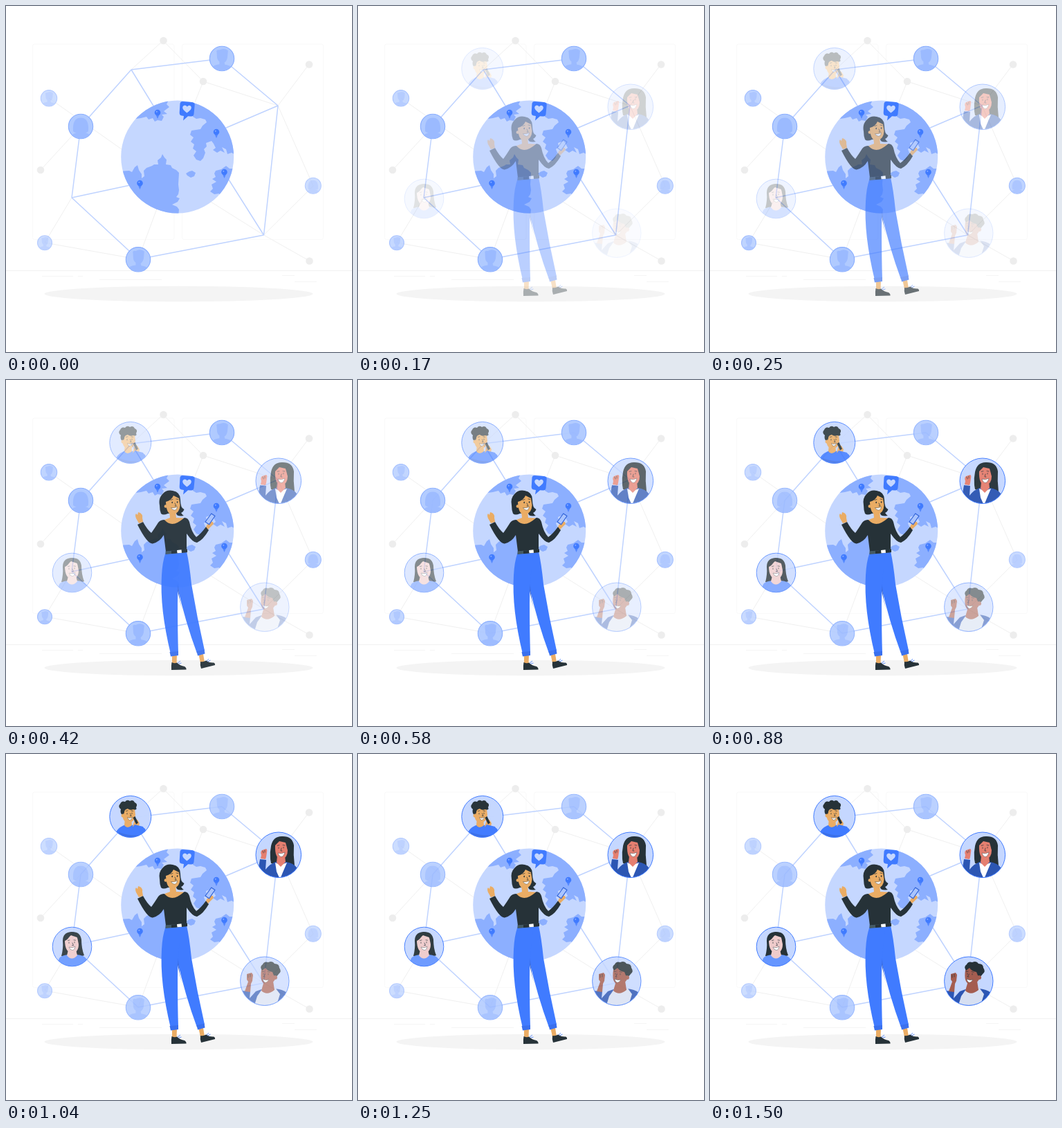
Animation of 500 by 500 pixels, one loop 1580 ms. Source, as an HTML page:

```html
<!DOCTYPE html>
<html lang="en">
<head>
<meta charset="utf-8">
<title>Connected world</title>
<style>
html, body { margin: 0; width: 100%; height: 100%; overflow: hidden; background: #fff; }
svg { display: block; width: 100%; height: 100%; }
.ink { fill: #263238; }
.blue { fill: #407bff; }
.navy { fill: #2c56b3; }
.tan { fill: #eaac64; }
.rose { fill: #e57f70; }
.pale { fill: #efcbcb; }
.brown { fill: #a45d50; }
.pen { fill: none; stroke: #263238; stroke-width: .7; stroke-linecap: round; }
.smile { fill: #fff; stroke: #263238; stroke-width: .4; }
.disc { fill: #c5d7ff; }
.ring { fill: none; stroke: #407bff; stroke-width: 1; }
.fade { opacity: 0; }
</style>
</head>
<body>
<svg viewBox="0 0 500 500">
  <defs>
    <clipPath id="globeClip"><circle cx="247.7" cy="218" r="81.5"/></clipPath>
    <clipPath id="clipA"><circle cx="179.8" cy="90.5" r="30"/></clipPath>
    <clipPath id="clipB"><circle cx="393.8" cy="145.8" r="32.8"/></clipPath>
    <clipPath id="clipC"><circle cx="95.5" cy="278.5" r="28.3"/></clipPath>
    <clipPath id="clipD"><circle cx="373.8" cy="328.2" r="35.2"/></clipPath>
  </defs>

  <g fill="none" stroke="#f9f9f9">
    <rect x="38.5" y="55" width="204.500" height="282.500" rx="3"/>
    <rect x="254.500" y="55" width="204" height="282.500" rx="3"/>
    <path d="M52 390.500H97M104 390.500H111M135 395.500H225M399 389.500H417M417 398.500H449" stroke="#f5f5f5"/>
    <path d="M0 382.500H500" stroke="#f1f1f1"/>
  </g>
  <ellipse cx="249.500" cy="416" rx="194" ry="11.300" fill="#f4f4f4"/>

  <g id="links" fill="none"></g>

  <circle cx="247.700" cy="218" r="81.500" fill="#c5d7ff"/>
  <g clip-path="url(#globeClip)" fill="#8cafff">
    <path d="M160 239L178 238 182 240 186 233 190 230 192 237 196 243 196 249 200 246 199 238 203 234 211 231 214 229 220 229 219 223 224 219 226 214 229 219 232 222 231 229 238 230 240 234 246 237 250 241 249 258 250 266 249 272 246 276 251 278 248 283 240 287 247 290 250 294 249 305 160 305Z"/>
    <path d="M180 166L188 163 195 162 203 160 206 164 212 162 215 167 219 165 225 166 228 160 225 157 233 156 228 152 236 146 232 142 237 132 180 132Z"/>
    <path d="M272 132L270 160 275 163 281 162 288 164 290 168 284 173 281 178 268 180 266 186 271 190 267 196 272 200 270 206 275 210 271 216 275 222 281 224 285 220 288 212 286 207 290 203 289 198 297 195 300 199 303 205 299 208 305 212 310 209 316 212 312 204 318 207 320 214 326 212 335 217 335 132Z"/>
    <path d="M335 235L323 235 318 231 311 236 303 238 301 242 303 247 298 250 304 254 297 258 299 264 295 268 301 272 308 271 311 278 335 278Z"/>
    <path d="M260 242L265 239 269 238 274 241 272 246 267 248 262 245Z"/>
  </g>
  <g id="pins"></g>
  <g>
    <path class="blue" d="M255 138L269 139Q273 139.500 272.700 143L271.500 156Q271 160 267 159.500L263 159.300 256 165.500 257 159 254 158.500Q250.500 158 250.700 154L251.500 141Q252 138 255 138Z"/>
    <path fill="#c5d7ff" d="M261.500 154.500C257 151 254.800 149 255.300 146C256 143 260 142.500 261.800 145.600C264 142.700 267.600 143.600 267.800 146.700C267.900 149.800 264.500 152 261.500 154.500Z"/>
  </g>

  <g id="nodes"></g>

  <g class="fade" data-key="A">
    <circle class="disc" cx="179.800" cy="90.500" r="30"/>
    <g clip-path="url(#clipA)">
      <path class="blue" d="M155 124L160 111Q164 105 173 102L186 103Q196 104 201 108L207 124Z"/>
      <path fill="#3567d6" d="M163 113Q180 119 196 117L204 124H158Z" opacity=".55"/>
      <path class="tan" d="M172 92L171 103Q175 109 182 103L181 94Z"/>
      <path class="tan" d="M168 83Q167 98 177 99.500Q186 99 187 88L186 79 171 76Z"/>
      <path class="ink" d="M169 90Q164 84 166 80Q161 76 165 72Q167 67 172 69Q175 65 179 68Q184 65 186 70Q191 72 188 77Q190 82 184 80Q179 82 176 79Q171 80 171 84Z"/>
      <circle class="tan" cx="169" cy="89" r="2.500"/>
      <path class="tan" d="M183 105L185 98Q186 94 190 95L193 100 192 105 189 108Z"/>
      <path class="ink" d="M183.500 92L186.500 90 191 99.500 188 101.500Z"/>
      <path class="blue" d="M181 108L186 102 198 105 201 112 188 115Z"/>
      <path class="pen" d="M175 85.500v1.500M182 85v1.500M173.500 82.500l2.500-.6M181 82l2.500.4M179.500 86l1.500 3.500h-1.800"/>
      <path class="smile" d="M175.500 91.500Q179 94 182.500 91Q181.500 96 178.500 95.500Q176.500 95 175.500 91.500Z"/>
    </g>
    <circle class="ring" cx="179.800" cy="90.500" r="30"/>
  </g>

  <g class="fade" data-key="B">
    <circle class="disc" cx="393.800" cy="145.800" r="32.800"/>
    <g clip-path="url(#clipB)">
      <path class="ink" d="M382 152Q381 142 383 133Q386 118 400 119Q414 119 416 132Q415 146 417 161L405 162 383 158Z"/>
      <path class="navy" d="M362 182L367 152 376 153 375 167Q382 158 392 155L405 156Q416 158 420 164L422 182Z"/>
      <path fill="#fff" d="M389 157L397 160 406 157 400 171 396 181 391 170Z"/>
      <path class="rose" d="M392 147L391 157 397 163 404 156 403 147Z"/>
      <path class="rose" d="M389 132Q388 151 398 152Q407 151 407 139L404 128 395 126Z"/>
      <path class="ink" d="M388 138Q388 126 399 124Q407 126 407 139L410 144 412 128 400 120 387 126Z"/>
      <path class="rose" d="M368 151L369 146Q367 141 370 139L376 137Q378 138 377 142L376 149 375 152Z"/>
      <path class="pen" d="M394 135v1.500M401 134.500v1.500M392 132.300l3-.6M400 131.500l3 .6M398 136l-1 4h2M371 140l1 3M374 139v3"/>
      <path class="smile" d="M393 143Q398 145 403 142Q401 149 397.500 148.500Q394.500 148 393 143Z"/>
    </g>
    <circle class="ring" cx="393.800" cy="145.800" r="32.800"/>
  </g>

  <g class="fade" data-key="C">
    <circle class="disc" cx="95.500" cy="278.500" r="28.300"/>
    <g clip-path="url(#clipC)">
      <path class="ink" d="M80 292Q83 281 82 270Q82 258 94 257Q107 256 109 268Q109 281 113 291L103 294Z"/>
      <path fill="#6696ff" d="M72 308L77 295Q80 291 89 290H103Q113 291 116 296L120 308Z"/>
      <path class="pale" d="M90 283L88 291Q95 300 103 291L101 283Z"/>
      <path class="pale" d="M85 269Q85 286 95 288Q105 287 105 275L103 265 94 262Z"/>
      <path class="ink" d="M84 274Q84 263 94 260Q104 261 106 274L108 270 104 259 92 258 83 265Z"/>
      <path class="ink" d="M94 260Q90 268 85 270L85 264Z"/>
      <path class="pen" d="M91 272v1.500M99 271.500v1.500M89.500 269.500l2.500-.6M98 268.800l2.500.4M96 273l1.500 3.500h-1.800"/>
      <path class="smile" d="M91 279Q96 281 100 278Q99 284 95.500 283.500Q92.500 283 91 279Z"/>
    </g>
    <circle class="ring" cx="95.500" cy="278.500" r="28.300"/>
  </g>

  <g class="fade" data-key="D">
    <circle class="disc" cx="373.800" cy="328.200" r="35.200"/>
    <g clip-path="url(#clipD)">
      <path class="navy" d="M338 342L353 343 352 353 361 343 372 339H388Q400 340 406 345L408 366H345Z"/>
      <path fill="#d6dff2" d="M370 340L390 339 396 347 390 366H358L363 350Z"/>
      <path class="brown" d="M373 328L369 342Q377 350 388 341L386 328Z"/>
      <path class="brown" d="M369 312Q366 331 376 333Q386 334 390 323L389 311 374 306Z"/>
      <path class="ink" d="M370 313Q366 307 371 304Q373 299 379 301Q385 298 388 303Q395 303 395 309Q399 314 394 318Q390 324 387 320L385 315Q378 314 375 309Z"/>
      <circle class="brown" cx="389" cy="323" r="3"/>
      <path class="brown" d="M345 343L350 329 348 326 348 318 355 316 357 319 356 328 354 332 353 344Z"/>
      <path class="pen" d="M372 317v1.500M379 317.500v1.500M370 314.500l3-.4M378 314.500l3 .8M374.500 318l-2.500 4h2M350 319v4M353 318v4"/>
      <path class="smile" d="M371 325Q375 328 380 326Q377 331 374 330Q371.500 329 371 325Z"/>
    </g>
    <circle class="ring" cx="373.800" cy="328.200" r="35.200"/>
  </g>

  <g class="fade" data-key="woman">
    <path class="tan" d="M240 397H247L246.500 410H240ZM278.500 397L285 396 287 408 281 409Z"/>
    <path class="ink" d="M239.500 408Q243 410 247 408.500Q252 413 258 414Q261 416 260.500 418.500L239 419Q238.500 413 239.500 408Z"/>
    <path class="ink" d="M281 407Q285 408 289 405.500Q294 409 300 408.500Q302.500 409.500 302 412L282 417Q280 412 281 407Z"/>
    <path d="M248 409l4-3M249.500 410l4-1M290 406l3-3M291.500 407l4-2" fill="none" stroke="#407bff" stroke-width=".8"/>
    <path class="blue" d="M247 249L261 248Q265 265 268 295Q276 343 287 391L276 395Q259 349 248 300Z"/>
    <path fill="#3060cf" d="M249 279Q247 300 254 331L248 305Z"/>
    <path class="blue" d="M230.500 250L254 249Q248 285 248 322Q248 365 249 395L238 396Q222 330 225 282Q226 263 230.500 250Z"/>
    <path fill="#3a70ee" d="M236.500 393L249 392 249 398 238 399.500ZM275.500 392L286.500 389.500 287.500 395.500 277 398.500Z"/>
    <path class="ink" d="M229 202Q240 210 258 199Q263 199 265 205Q268 220 275 227Q282 222 289 212L293 217Q285 231 276 235Q270 235 261 222L261 245 231 248 228 224Q222 234 212 236.500Q204 237 190 209L198 205Q204 216 210 221Q215 214 220 206Q223 202 229 202Z"/>
    <path fill="#455a64" d="M230.500 247.500L261.500 244.500 262 249 230.500 252Z"/>
    <path class="ink" d="M239 246.700L262 244.500 262 249 239 251Z"/>
    <path fill="#fff" d="M247 246L253.500 245.300 254 249.800 247.500 250.300Z"/>
    <path class="tan" d="M236 190L237 199 229 202Q240 215 257 199.500L246 199 245 190Z"/>
    <path class="tan" d="M192 207L188 200Q186 195 188 193L190 195 191 191 194 192Q198 195 197 199L198 205Z"/>
    <path class="tan" d="M289 212L292 207Q295 204 299 205L300 208 295 213 292 216Z"/>
    <path d="M296.800 193L302 196.500 293.500 208.800 288 205Z" fill="#a9c4ff" stroke="#2f62d8" stroke-width="1.200" stroke-linejoin="round"/>
    <path class="ink" d="M222 181Q220 171 226 165Q232 158 241 160Q252 162 252 173Q252 185 257.500 187Q256 191 253 192Q255 195 257 196Q246 198 246 192L234 193Q227 196 224 193Q222 188 222 181Z"/>
    <path class="tan" d="M231 177Q232 195 241 194.500Q251 193 251.500 181L250 171 242 167Q239 174 231 176Z"/>
    <circle class="tan" cx="230.800" cy="182.500" r="2.200"/>
    <path class="pen" d="M238 173.500l3-1M246 172l3 .5M244 178l2 4h-2"/>
    <ellipse class="ink" cx="240.200" cy="177" rx=".8" ry="1.300"/>
    <ellipse class="ink" cx="247.600" cy="176.500" rx=".8" ry="1.300"/>
    <path class="smile" d="M238.500 184.500Q243 186 247.500 183Q246.500 188.500 243 188Q240 187.500 238.500 184.500Z"/>
  </g>
</svg>
<script>
const LOOP = 1580, START = 130, STEP = 41.6;

const put = (id, html) => { document.getElementById(id).innerHTML = html; };

// Network: shared joints, then the spokes leaving each one
const hub = { n: '181 92', e: '393 144', s: '372.5 331', w: '95 277' };
const blueLinks = [
  [hub.n, '312 76', '108 174', '219 154'],
  [hub.e, '312 76', '304 182', hub.s],
  [hub.s, '315 240', '191 366'],
  [hub.w, '191 366', '108 174', '193 256']
];
const greyLinks = [
  ['227 50', hub.n, '285 109'],
  ['285 109', hub.e, '273 139'],
  [hub.e, '438 84', '444 260'],
  ['62 133', '170 209'],
  ['50 237', '108 174'],
  ['56 342', hub.w, '191 366'],
  ['191 366', '218 293'],
  [hub.s, '444 260', '438 368', '296 283']
];
const spokes = list => list.map(([from, ...to]) => to.map(p => `M${from}L${p}`).join('')).join('');
put('links', `<path d="${spokes(greyLinks)}" stroke="#f0f0f0"/>
  <path d="${spokes(blueLinks)}" stroke="#bfd3ff" stroke-width="1.5"/>`);

put('pins', [[219, 154], [304, 182], [315.5, 240], [193.5, 256]].map(([x, y]) =>
  `<path class="blue" d="M${x - 3} ${y + 2}L${x} ${y + 9}L${x + 3} ${y + 2}Z" opacity=".75"/>
   <circle class="blue" cx="${x}" cy="${y}" r="4.3"/>
   <circle cx="${x - 1.2}" cy="${y - 1.3}" r="1" fill="#8cafff"/>`).join(''));

// Plain busts, drawn for a unit circle
const busts = {
  short: 'M-.42-.5Q-.5-.75-.2-.7Q.2-.9.5-.65L.45-.1Q.4.2.2.32L.25.5Q.6.55.75.66Q0 1.3-.75.66Q-.6.5-.2.46L-.2.25Q-.4.1-.4-.15Z',
  long: 'M-.62.4Q-.7-.7 0-.7Q.7-.7.62.4Q.5.55.3.5Q.65.6.72.69Q0 1.3-.72.69Q-.6.6-.3.5Q-.5.55-.62.4Z'
};
const person = ([x, y, r, bust]) => {
  const big = r > 15;
  return `<g class="${big ? 'big' : 'small'}" transform="translate(${x} ${y}) scale(${r})">
    <circle r="1" fill="${big ? '#b0caff' : '#bcd2ff'}" stroke="${big ? '#88adff' : '#9cbaff'}" stroke-width="${1.1 / r}"/>
    <path d="${busts[bust]}" fill="${big ? '#9bbaff' : '#a9c4ff'}"/></g>`;
};
const dots = [[227.5, 50], [285, 109], [438, 84.5], [50, 237], [438.5, 368.5]];
put('nodes', dots.map(([x, y]) => `<circle cx="${x}" cy="${y}" r="5.3" fill="#ededed"/>`).join('') + [
  [312, 76, 17.7, 'short'], [108, 174, 17.7, 'long'], [191, 366.3, 17.7, 'short'],
  [62, 133.3, 11.7, 'short'], [443.8, 259.7, 11.5, 'long'], [56, 342.3, 10.5, 'short']
].map(person).join(''));

// Opacity at selected steps; straight lines in between
const steps = [-1, 0, 3, 7, 11, 18, 22, 33];
const fades = {
  woman: [0, .2, .67, .94, 1, 1, 1, 1],
  B: [0, .12, .41, .61, .74, .96, 1, 1],
  A: [0, .09, .32, .49, .62, .87, .98, 1],
  C: [0, .07, .27, .44, .56, .78, .9, 1],
  D: [0, .04, .17, .29, .39, .56, .68, 1],
  big: [1, 1, 1, 1, .96, .87, .85, .85],
  small: [.75, .8, .95, .95, .9, .8, .75, .75]
};
const level = (table, k) => {
  const i = Math.max(1, steps.findIndex(s => s >= k));
  const p = (k - steps[i - 1]) / (steps[i] - steps[i - 1]);
  return table[i - 1] + (table[i] - table[i - 1]) * p;
};
const parts = Object.entries(fades).map(([key, table]) =>
  [document.querySelectorAll(`[data-key="${key}"], .${key}`), table]);

let last = null;
function draw() {
  const t = performance.now() % LOOP;
  const k = t < START ? -1 : Math.min(33, Math.floor((t - START + 8) / STEP));
  if (k !== last) {
    for (const [els, table] of parts) els.forEach(el => { el.style.opacity = level(table, k); });
    last = k;
  }
  requestAnimationFrame(draw);
}
draw();
</script>
</body>
</html>
```
